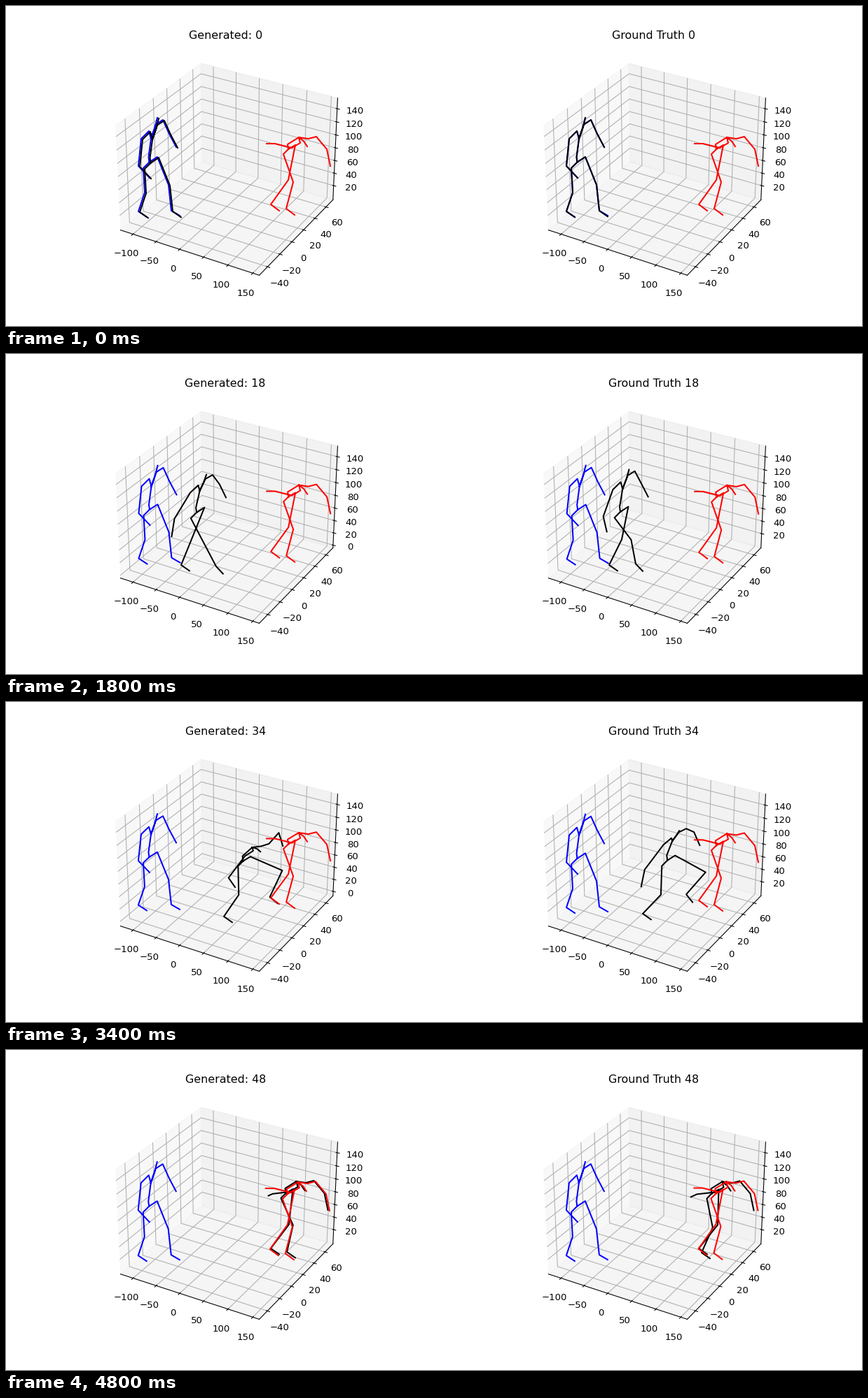
A matplotlib script for the animation above (4.9 s loop, 1222x458 px).

```python
import numpy as np
import matplotlib.pyplot as plt
from matplotlib.animation import FuncAnimation

W, H, DPI = 1222, 458, 96
PANEL = W / 2
LAST = 48
plt.rcParams["font.size"] = 9.94

# Default camera (elev 30, azim -60) of a 4:4:3 box, in panel pixels
K = 0.77 * H / 1.85
CX = 0.5125 * PANEL + 0.025 * K
CY = 0.89 * H - 0.95 * K
BOX_W, BOX_H = 1.1905, 0.8929
COS, SIN = np.sqrt(3) / 2, 0.5

XLIM = (-127.6, 162.8)
BASE = (-53, 73, -3, 156)          # y0, y1, z0, z1
BLUE_Y, RED_Y = -35, 37


def phase(t, a, b):
    return min(max((t - a) / (b - a), 0), 1)


def ease(t, a, b):
    u = phase(t, a, b)
    return u * u * (3 - 2 * u)


def bump(t, mid, width):
    return np.exp(-((t - mid) / width) ** 2)


def mix(a, b, w):
    return a + (b - a) * w


def pose(leg_a, leg_b, torso, arm_a, arm_b):
    """Joints: hip..toe twice, chest, head, collar..hand, shoulder..hand."""
    return np.array(leg_a + leg_b + torso + arm_a + arm_b, float).reshape(-1, 2)


START = pose((196, 232, 198, 267, 189, 294, 201, 302),
             (216, 216, 232, 256, 236, 293, 248, 300),
             (207, 190, 216, 160),
             (204, 179, 193, 190, 189, 229, 205, 246),
             (224, 163, 233, 183, 243, 202))
GOAL = pose((396, 212, 410, 252, 400, 290, 412, 299),
            (413, 199, 403, 249, 378, 284, 390, 293),
            (418, 188, 430, 201),
            (420, 196, 408, 203, 384, 197, 372, 197),
            (443, 187, 458, 205, 463, 229))


def pelvis(p):
    return (p[0] + p[4]) / 2


def skeleton(p):
    """Polyline through all bones, with gaps between the chains."""
    root = pelvis(p) + (-1.5, -0.5)
    low = root + (-1, -7)
    chest, head = p[8], p[9]
    neck = (chest + head) / 2 + (1, -1)
    collar_b = (p[10] + p[14]) / 2 + (0, -1.5)
    gap = np.full(2, np.nan)
    return np.array([root, *p[:4], gap, root, *p[4:8], gap,
                     root, low, chest, neck, head, gap,
                     chest, *p[10:14], gap, chest, collar_b, *p[14:]])


def lift(px, y, lims):
    """Place panel pixels in data space on the plane of the given y."""
    y0, y1, z0, z1 = lims
    a, b = (px[:, 0] - CX) / K, (CY - px[:, 1]) / K
    by = BOX_W * ((y - y0) / (y1 - y0) - 0.5)
    near = 0
    for _ in range(8):
        bx = (a * (1 - near / 10) - SIN * by) / COS
        bz = (b * (1 - near / 10) + 0.25 * bx - 0.5 * COS * by) / COS
        near = 0.5 * COS * bx - 0.75 * by + SIN * bz
    x = XLIM[0] + (bx / BOX_W + 0.5) * (XLIM[1] - XLIM[0])
    z = z0 + (bz / BOX_H + 0.5) * (z1 - z0)
    return x, np.full_like(x, y), z


def step(t, plants, swings, height):
    """Ankle and toe of a foot moving from plant to plant."""
    plants = np.array(plants, float)
    ankle, tilt = plants[0], 0
    for (a, b), here, there in zip(swings, plants, plants[1:]):
        s = phase(t, a, b)
        stride = there[0] - here[0]
        ankle = ankle + (there - here) * ease(t, a, b)
        ankle = ankle - (0, height * stride * np.sin(np.pi * s))
        tilt += stride / 120 * 40 * np.sin(np.pi * np.sqrt(s))
    angle = np.radians(35 + tilt)
    return ankle, ankle + 14.5 * np.array([np.cos(angle), np.sin(angle)])


def knee(hip, ankle, thigh, shin):
    """Joint of a two-bone leg that bends forward."""
    v = ankle - hip
    d = np.hypot(*v)
    if d >= thigh + shin:
        return hip + v * thigh / (thigh + shin)
    along = (thigh ** 2 - shin ** 2 + d * d) / (2 * d)
    side = np.sqrt(max(thigh ** 2 - along ** 2, 0))
    return hip + (v * along + np.array([v[1], -v[0]]) * side) / d


def bones(p, i):
    return np.hypot(*np.diff(p[i:i + 3], axis=0).T)


class Walker:
    def __init__(self, shift, end, pace, bend, swing,
                 plant, last_a, swing_b, height_b):
        self.shift, self.end, self.pace = shift, end, pace
        self.bend, self.swing = bend, swing
        self.feet = {
            0: ([START[2] + shift, plant, GOAL[2] + last_a],
                [(5, 21), (38, LAST)], 0.03),
            4: ([START[6] + shift, (250, 302), GOAL[6]],
                [(0, 8), swing_b], height_b)}

    def at(self, t):
        u, late = t / LAST, ease(t, 38, LAST)
        b = self.bend(t)
        s = np.sin(np.pi * t / self.swing) ** 2
        first, final = START - pelvis(START), GOAL - pelvis(GOAL)

        # Torso leans over, one arm swings back, both reach out at the end
        p = mix(first, final, b)
        hang = first[12:14] + [(-17 * s, 22 * b), (-38 * s, 10 * s + 14 * b)]
        p[12:14] = mix(hang, final[12:14], 0.75 * late)
        p[15:, 1] = mix(first[15:, 1], final[15:, 1], late)

        bob = 5 * np.sin(np.pi * t / 14.5) ** 2 * (1 - late)
        way = np.array([u ** self.pace, ease(t, 32, LAST)])
        p += mix(pelvis(START) + self.shift, pelvis(GOAL) + self.end, way)
        p += (0, bob)

        for i, foot in self.feet.items():
            ankle, toe = step(t, *foot)
            size = mix(bones(START, i), bones(GOAL, i), np.sqrt(u))
            p[i + 1:i + 4] = knee(p[i], ankle, *size), ankle, toe
        return p


made = Walker(shift=(2, 1), end=(-3.5, 0), pace=1.1,
              bend=lambda t: ease(t, 10, 42), swing=42,
              plant=(311, 307), last_a=(1, -1),
              swing_b=(19, 35), height_b=0.2)
real = Walker(shift=(0, 0), end=(-6.5, 0.5), pace=1.16,
              bend=lambda t: (t / LAST) ** 3, swing=70,
              plant=(298, 303), last_a=(-18, 0),
              swing_b=(21, 38), height_b=0.13)


def made_lims(t):
    y0, y1, z0, z1 = BASE
    dip = bump(t, 12.5, 4.5) + bump(t, 36.5, 4.5)
    return (y0 - 2.7 * bump(t, 13, 4), y1 + 2 * ease(t, 42, LAST),
            z0 - 6 * dip, z1)


def real_lims(t):
    y0, y1, z0, z1 = BASE
    return (y0 - 3.7 * bump(t, 13, 4), y1 + ease(t, 42, LAST),
            z0, z1 + 3 * bump(t, 29, 4))


fig = plt.figure(figsize=(W / DPI, H / DPI), dpi=DPI)


def panel(left):
    ax = fig.add_axes([left + 0.0625, 0.11, 0.3875, 0.77], projection="3d")
    lines = [ax.plot([], [], [], color=c)[0] for c in ("blue", "black", "red")]
    lines[0].set_data_3d(*lift(skeleton(START), BLUE_Y, BASE))
    lines[2].set_data_3d(*lift(skeleton(GOAL), RED_Y, BASE))
    ax.set_xticks(range(-100, 151, 50))
    ax.set_yticks(range(-40, 61, 20))
    return ax, lines[1]


panels = [(*panel(0), made, made_lims, "Generated: %d"),
          (*panel(0.5), real, real_lims, "Ground Truth %d")]


def draw(i):
    artists = []
    for ax, line, walker, limits, title in panels:
        lims = y0, y1, z0, z1 = limits(i)
        floor_seen = z0 + (z1 - z0) / 50 <= 0
        ax.set_zticks(range(0 if floor_seen else 20, 141, 20))
        ax.set_xlim(*XLIM)
        ax.set_ylim(y0, y1)
        ax.set_zlim(z0, z1)
        line.set_data_3d(*lift(skeleton(walker.at(i)), 0, lims))
        artists += [line, ax.set_title(title % i)]
    return artists


anim = FuncAnimation(fig, draw, frames=LAST + 1, interval=100, repeat=True,
                     repeat_delay=0, blit=False)
plt.show()
```
